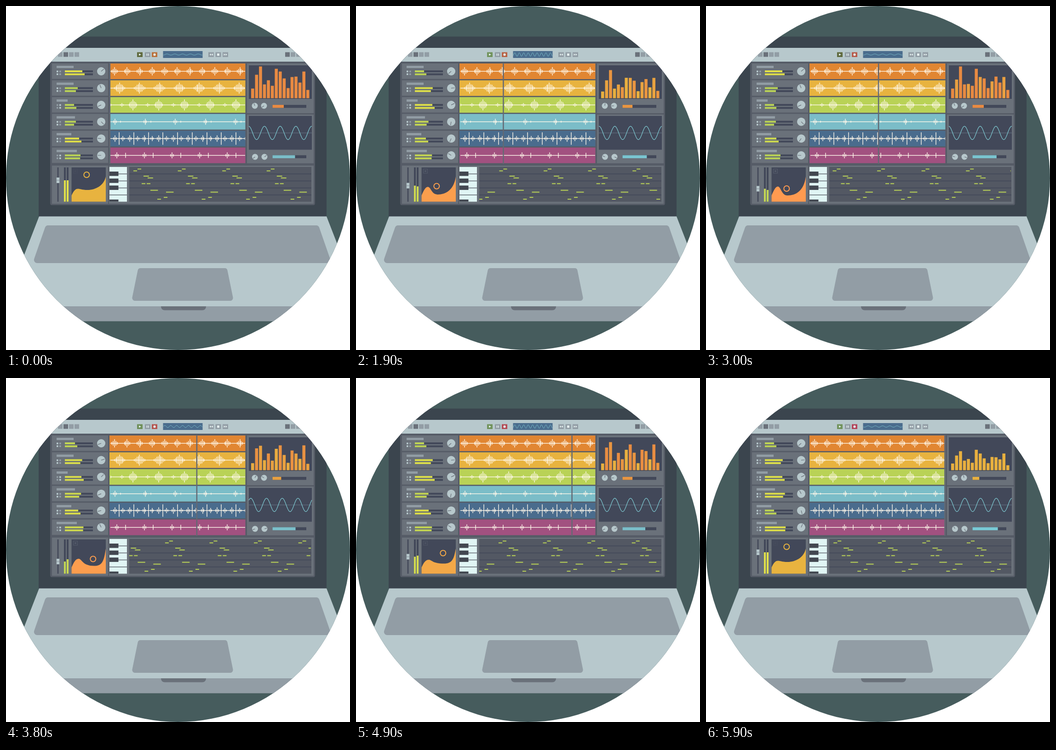
Animation of 748 by 748 pixels, one loop 6 s. Source, as an HTML page with a canvas:

```html
<!DOCTYPE html>
<html lang="en">
<head>
<meta charset="utf-8">
<title>Music studio laptop</title>
<style>
html, body { margin: 0; width: 100%; height: 100%; overflow: hidden; background: #fff; }
canvas { display: block; }
</style>
</head>
<body>
<canvas id="stage" width="748" height="748"></canvas>
<script>
const ctx = document.getElementById('stage').getContext('2d');
const PALE = '#b7c8cc', GREY = '#929da5', PANEL = '#6a717a', GAP = '#565c67', DARK = '#424859';
const LIME = '#b9d256', YELLOW = '#e0df49', AMBER = '#e8b33f', ORANGE = '#e88a42', BLUE = '#4a6c8d';
const CREAM = '#fff8ea', ROW = 36.55, LOOP = 5.9;

function rect(x, y, w, h, color) {
  ctx.fillStyle = color;
  ctx.fillRect(x, y, w, h);
}
function round(x, y, w, h, r, color) {
  ctx.fillStyle = color;
  ctx.beginPath();
  ctx.roundRect(x, y, w, h, r);
  ctx.fill();
}
function disc(x, y, r, color) {
  ctx.fillStyle = color;
  ctx.beginPath();
  ctx.arc(x, y, r, 0, 7);
  ctx.fill();
}
// Symmetric trapezoid with rounded corners
function trapezoid(cx, top, bottom, topWidth, bottomWidth, r, color) {
  const a = topWidth / 2, b = bottomWidth / 2;
  ctx.fillStyle = color;
  ctx.beginPath();
  ctx.moveTo(cx, top);
  ctx.arcTo(cx + a, top, cx + b, bottom, r);
  ctx.arcTo(cx + b, bottom, cx - b, bottom, r);
  ctx.arcTo(cx - b, bottom, cx - a, top, r);
  ctx.arcTo(cx - a, top, cx, top, r);
  ctx.fill();
}
function sine(x0, x1, y, amp, period, peak, color, width) {
  ctx.strokeStyle = color;
  ctx.lineWidth = width;
  ctx.beginPath();
  for (let x = x0; x <= x1; x += 0.5) ctx.lineTo(x, y - amp * Math.cos((x - peak) * 2 * Math.PI / period));
  ctx.stroke();
}
function clipped(x, y, w, h, draw) {
  ctx.save();
  ctx.beginPath();
  ctx.rect(x, y, w, h);
  ctx.clip();
  draw();
  ctx.restore();
}
function knob(x, y, r, degrees) {
  const a = degrees * Math.PI / 180;
  disc(x, y, r, PALE);
  ctx.strokeStyle = PANEL;
  ctx.lineWidth = 1.2;
  ctx.beginPath();
  ctx.moveTo(x, y);
  ctx.lineTo(x + Math.cos(a) * r * 0.85, y + Math.sin(a) * r * 0.85);
  ctx.stroke();
}
function slider(x, y, w, h, value, color) {
  rect(x, y, w, h, DARK);
  rect(x, y, value, h, color);
}
function mix(a, b, k) {
  const part = (c, i) => parseInt(c.slice(i, i + 2), 16);
  return `rgb(${[1, 3, 5].map(i => Math.round(part(a, i) + (part(b, i) - part(a, i)) * k))})`;
}
const clamp = k => Math.max(0, Math.min(1, k));
const phase = (t, period) => t % period / period;
// Rises from 0 to 1 at the peak time, then falls back to 0 at the end
const tent = (t, peak, end) => t < peak ? t / peak : (end - t) / (end - peak);

// bursts: offset, height and number of strokes on each side
const tracks = [
  { color: '#e18632', label: 37, period: 1, level: 38, rise: -20, angle: -40, first: 236, pitch: 27.25, bursts: [[0, 18, 2]] },
  { color: '#e8b33f', label: 37, period: 1, level: 28, rise: 12, angle: -112, first: 247, pitch: 43.3, bursts: [[0, 24, 4]] },
  { color: '#b9d256', label: 24, period: 1, level: 20, rise: 20, angle: 155, first: 276, pitch: 56, bursts: [[-24, 8, 1], [0, 24, 3]] },
  { color: '#7bbdc8', label: 40, period: 1.5, level: 24, rise: 21, angle: 45, first: 237, pitch: 65.5, bursts: [[0, 13, 1], [12, 4, 0]] },
  { color: BLUE, label: 32, period: 1.2, level: 31, rise: -12, angle: 185, first: 246, pitch: 31.75, bursts: [[-9, 14, 1], [0, 27, 0], [8, 11, 1]] },
  { color: '#a25180', label: 44, period: 1.5, level: 34, rise: 12, angle: 180, first: 241, pitch: 60, bursts: [[0, 13, 1], [19, 11, 0]] }
];
const spectrum = [21, 51, 69, 30, 39, 27, 64, 58, 43, 22, 46, 47, 34, 58, 18];
// Start of the upper and the lower note in each lane
const lanes = [[286, 277], [299, 308], [295, 306], [314, 348], [343, 329]];

function drawLaptop() {
  rect(0, 0, 748, 748, '#465c5d');
  rect(71, 66.5, 626, 391.5, '#3b454e');
  trapezoid(384.5, 457.5, 653, 625, 777, 0, PALE);
  rect(0, 653, 748, 32.5, GREY);
  trapezoid(383, 477, 559, 593, 650, 7, GREY);
  trapezoid(384, 570, 641, 193, 222, 6, GREY);
  round(337, 653, 98, 8.5, [0, 0, 8, 8], PANEL);
  rect(71, 91, 626, 30, PALE);
  round(96, 121, 576, 312, [0, 0, 4, 4], GAP);
}

function drawToolbar(t) {
  for (const x of [113, 125, 137, 149, 607, 619, 631]) rect(x, 100.5, 10, 10, x === 125 || x === 607 ? PANEL : GREY);
  for (const x of [302, 440, 455.5, 471]) rect(x, 100.5, 12, 10.5, GREY);
  rect(285, 100.5, 12, 10.5, mix('#5f6a3f', '#73985f', t % 1));
  rect(317, 100.5, 12, 10.5, mix('#b9713d', '#b3445a', t / 6));
  const white = '#e4efef';
  const arrow = (x, d) => {
    ctx.fillStyle = white;
    ctx.fill(new Path2D(`M${x} 103.3l${d} 2.4l${-d} 2.4z`));
  };
  arrow(289, 5);
  for (const x of [305.5, 308.8]) rect(x, 103.3, 1.8, 5, white);
  disc(323, 105.7, 2.6, white);
  for (const x of [446, 450]) arrow(x, -3.5);
  rect(459, 103.2, 5, 5, white);
  for (const x of [473.5, 477.5]) arrow(x, 3.5);
  rect(341.5, 98, 86, 15, BLUE);
  const k = tent(t % 3, 2, 3);
  sine(342, 427, 105.5, 1.2 + 2.8 * k, 17 / (1 + 0.8 * k), 384, '#7bbdc8', 1);
}

function drawWave(track, mid) {
  rect(227, mid - 0.7, 293.5, 1.4, CREAM);
  for (let x = track.first - track.pitch; x < 540; x += track.pitch)
    for (const [dx, height, side] of track.bursts)
      for (let n = -side; n <= side; n++) {
        const h = height * (1 - Math.abs(n) / (side + 1)) * (n % 2 ? 0.85 : 1);
        rect(Math.round(x + dx + n * 2.8) - 0.7, mid - h / 2, 1.4, h, CREAM);
      }
}

function drawTracks(t) {
  tracks.forEach((track, i) => {
    const top = 125 + i * ROW, mid = top + 17, k = phase(t, track.period);
    rect(100, top, 122, 33.5, PANEL);
    rect(110, top + 5, track.label, 5, GREY);
    for (let n = 0; n < 4; n++) {
      const bright = i % 3 === 2 ? n % 2 : n % 2 === 0;
      rect(110 + n % 2 * 6, top + 15.5 + (n >> 1) * 6, 3.6, 3.6, bright ? PALE : GREY);
    }
    const value = track.level + track.rise * k;
    const color = mix(LIME, YELLOW, track.rise > 0 ? k : 1 - k);
    slider(128, top + 15, 61, 4, value, color);
    slider(128, top + 21.5, 61, 4, value + (i % 2 ? -4 : 5) * (i < 5 ? 1 : 0.2), color);
    knob(207, mid, 9, track.angle + track.rise * 10 * k);
    rect(225, top, 295.5, 34, track.color);
    clipped(227, top, 293, 34, () => drawWave(track, mid));
  });
  rect(224.6 + t * 49.75, 124, 2.5, 219, '#636973');
}

function drawMeters(t) {
  const u = phase(t, 1.5), v = phase(t, 1.2);
  rect(524, 125, 145, 108, PANEL);
  rect(528, 129, 137, 73, DARK);
  spectrum.forEach((height, i) => {
    const period = [1, 1.2, 1.5][i % 3], k = phase(t, period);
    const h = height * (1 - k * Math.min(0.34 * period, 0.43));
    rect(533 + i * 8.57, 200.5 - h, 6.6, h, mix(ORANGE, AMBER, k));
  });
  knob(541, 217, 6.5, -110 + 100 * u);
  knob(561, 217, 6.5, 145 + 120 * u);
  slider(579.5, 215, 73.5, 6.5, 24.5 - 10.5 * u, mix(ORANGE, AMBER, u));

  rect(524, 236, 145, 106, PANEL);
  rect(528, 239, 137, 73.5, DARK);
  rect(528, 275.5, 137, 1, '#647486');
  sine(528, 665, 276, 14.5, 34.2, 562 - t % 1 / 0.92 * 34.2, '#7bc3cc', 1.3);
  knob(541.5, 328, 6.5, 140 + 108 * v);
  knob(562, 328, 6.5, -35 + 108 * v);
  slider(579.5, 324.5, 73.5, 6.5, 49 + 6.6 * v, mix('#7bbdc8', '#79cbd6', v));
}

function drawEqualizer(t) {
  const k = Math.sin(Math.PI * t / LOOP) ** 1.15;
  const side = clamp((t - 3) / 0.8) - clamp(t - 4.9);
  const x = 175.3 + 14 * side, y = 367 + 30 * k;
  const dip = 400 + 12 * k - 2 * side, hump = 397.5 - 5 * k, top = 156 + 2 * side;
  const color = mix(AMBER, '#ff9a50', k);
  rect(142.5, 351, 74.5, 74.5, DARK);
  ctx.globalAlpha = 0.15 + 0.6 * k;
  ctx.strokeStyle = '#5e6675';
  ctx.lineWidth = 1;
  ctx.strokeRect(146.5, 354.5, 9, 9);
  rect(149, 357.5, 4, 3, '#5e6675');
  ctx.globalAlpha = 1;

  ctx.fillStyle = color;
  ctx.beginPath();
  ctx.moveTo(142.5, 412);
  ctx.bezierCurveTo(147, 402, 151, hump, top, hump);
  ctx.bezierCurveTo(top + 7, hump, top + 8, dip, x + 2, dip);
  ctx.bezierCurveTo(x + 20, dip, 213, dip - 10, 217, 371);
  ctx.lineTo(217, 425.5);
  ctx.lineTo(142.5, 425.5);
  ctx.fill();
  ctx.strokeStyle = color;
  ctx.lineWidth = 2;
  ctx.beginPath();
  ctx.arc(x, y, 6, 0, 7);
  ctx.stroke();
}

function drawMixer(t) {
  rect(100, 347, 122, 83, PANEL);
  const level = 379 + 22 * tent(t, 3.6, LOOP);
  const second = 379 + 21 * tent(t, 3, LOOP);
  rect(111.7, 351, 2.6, 74.5, DARK);
  rect(109.8, level - 6, 6.4, 12, PALE);
  rect(109.8, level - 0.7, 6.4, 1.4, GREY);
  [level, second].forEach((y, i) => {
    const x = 126 + i * 6;
    rect(x, 351, 4, 74.5, DARK);
    rect(x, y, 4, 425.5 - y, mix(YELLOW, LIME, (y - 379) / 25));
  });
  drawEqualizer(t);
}

function drawPianoRoll(t) {
  rect(224, 347, 445, 83, PANEL);
  rect(225, 350, 38, 75.5, '#e0f5f4');
  rect(268, 350, 396, 75.5, '#535863');
  for (let i = 1; i < 6; i++) {
    const y = 350 + i * 15.2;
    if (i < 5) {
      rect(225, y - 0.8, 38, 1.6, PANEL);
      rect(268, y - 0.8, 396, 1.6, DARK);
    }
    if (i !== 4) rect(225, y - 5.2, 19.5, Math.min(9.5, 430.7 - y), '#424750');
  }
  clipped(268, 350, 395, 76, () => {
    const shift = t * 193 / LOOP;
    for (let n = -1; n < 7; n++)
      lanes.forEach((starts, lane) => starts.forEach((x, low) => {
        const y = 354.5 + lane * 15.4 + (low || lane === 2 ? 4 : 0) - (lane === 2 ? 3 : 0);
        const w = lane % 2 ? 9.5 + 2.3 * lane : 8;
        rect(x + n * 96.6 - shift, y - 1, w, 2, LIME);
      }));
  });
}

function draw(t) {
  ctx.clearRect(0, 0, 748, 748);
  ctx.save();
  ctx.beginPath();
  ctx.arc(374, 374, 374, 0, 7);
  ctx.clip();
  drawLaptop();
  drawToolbar(t);
  drawTracks(t);
  drawMeters(t);
  drawMixer(t);
  drawPianoRoll(t);
  ctx.restore();
}

const start = performance.now();
function tick() {
  const step = Math.floor((performance.now() - start) / 100) % 60;
  draw(step / 10);
  requestAnimationFrame(tick);
}
tick();
</script>
</body>
</html>
```
